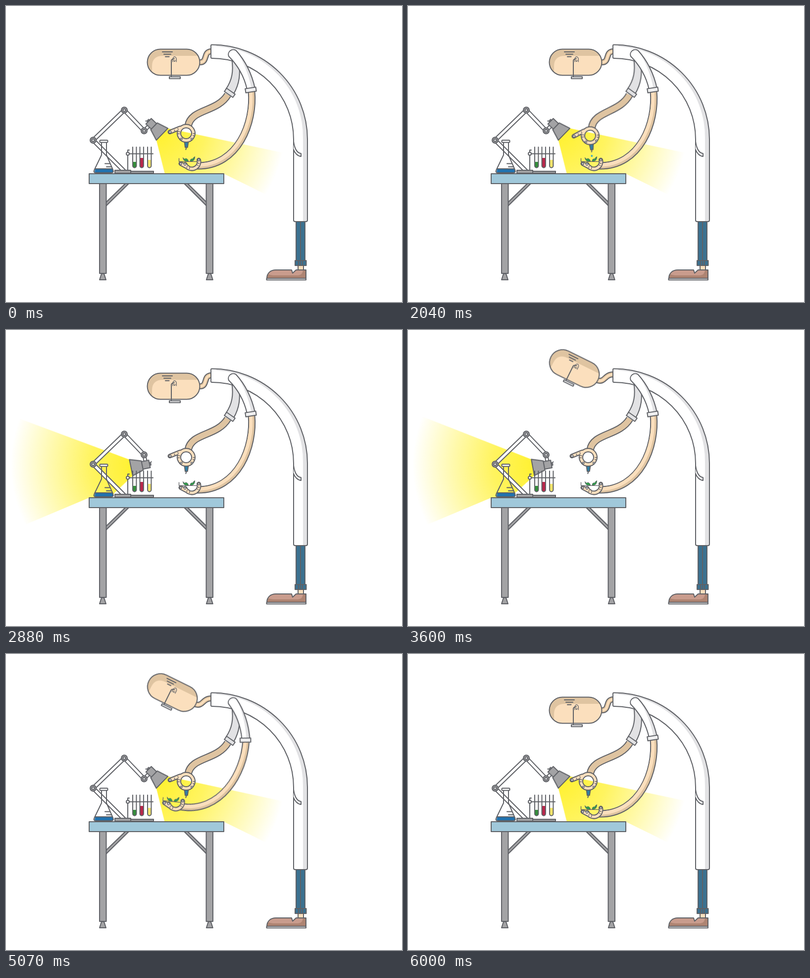
Recreate the animation shown at these times as an HTML page. Size 800 by 600 pixels, loop 6.21 s.

```html
<!DOCTYPE html>
<html lang="en">
<head>
<meta charset="utf-8">
<title>Lab bench</title>
<style>
html, body { margin: 0; width: 100%; height: 100%; overflow: hidden; background: #fff; }
svg { display: block; width: 800px; height: 600px; }
:root { --ink: #5f6166; --skin: #fbdfbd; --tan: #dfc4a1; --steel: #a3a3a5; --cloth: #e2e2e4; }
.o { stroke: var(--ink); stroke-width: 2; stroke-linejoin: round; stroke-linecap: round; }
.l { fill: none; }
.w { fill: #fff; }
.skin { fill: var(--skin); }
.steel { fill: var(--steel); }
.cloth { fill: var(--cloth); }
.blue { fill: #3b7190; }
.leaf { fill: #2fa04b; stroke-width: 1; }
.nail { fill: #fff; stroke-width: 1.5; }
.thin { stroke-width: 1.3; }
/* Stroked tubes: the same path drawn wide in ink, then narrower in colour */
.t { fill: none; stroke-linecap: round; stroke-linejoin: round; }
.butt { stroke-linecap: butt; }
.ink { stroke: var(--ink); }
.fs { stroke: var(--skin); }
.ft { stroke: var(--tan); }
.fw { stroke: #fff; }

.anim, .anim * { animation-duration: 6210ms; animation-iteration-count: infinite; }
.lamp { transform-origin: 279px 253px; animation-name: lamp; }
.head { transform-origin: 414px 91px; animation-name: head; }
.neck { animation-name: neck; }
.arm { transform-origin: 458px 97px; animation-name: arm; }
.fore { transform-origin: 495px 172px; animation-name: fore; }
.cup { transform-origin: 388px 322px; animation-name: cup; }
.back, .reach, .pinch { animation-timing-function: ease-in-out; }
.back { transform-origin: 462px 105px; animation-name: back; }
.reach { transform-origin: 452px 176px; animation-name: reach; }
.pinch { transform-origin: 364px 258px; animation-name: pinch; }
.drop { animation-name: drop; animation-timing-function: linear; }

@keyframes lamp {
  0%, 33.01% { transform: rotate(44deg); animation-timing-function: cubic-bezier(.5,0,.15,1); }
  48.31%, 72.46% { transform: rotate(169.5deg); animation-timing-function: cubic-bezier(.5,0,.3,1); }
  82.13%, 100% { transform: rotate(44deg); }
}
@keyframes head {
  0%, 47.75% { transform: rotate(0deg); animation-timing-function: cubic-bezier(.45,0,.4,1); }
  53.54%, 87.36% { transform: rotate(26.3deg); animation-timing-function: cubic-bezier(.45,0,.4,1); }
  92.75%, 100% { transform: rotate(0deg); }
}
@keyframes neck {
  0%, 47.75% { d: path("M389 114C409 117 397 92 415 92"); animation-timing-function: cubic-bezier(.45,0,.4,1); }
  53.54%, 87.36% { d: path("M382 102C399 107 396 90 415 90"); animation-timing-function: cubic-bezier(.45,0,.4,1); }
  92.75%, 100% { d: path("M389 114C409 117 397 92 415 92"); }
}
@keyframes arm {
  0%, 58.78% { transform: rotate(0deg); animation-timing-function: ease-in-out; }
  70.05%, 74.24% { transform: rotate(18.4deg); animation-timing-function: ease-in-out; }
  88.9% { transform: rotate(-1.6deg); animation-timing-function: ease-in-out; }
  96%, 100% { transform: rotate(0deg); }
}
@keyframes fore {
  0%, 58.78% { transform: rotate(0deg); animation-timing-function: ease-in-out; }
  70.05%, 74.24% { transform: rotate(-2.6deg); animation-timing-function: ease-in-out; }
  88.9% { transform: rotate(4.3deg); animation-timing-function: ease-in-out; }
  96%, 100% { transform: rotate(0deg); }
}
@keyframes cup {
  0%, 58.78% { transform: rotate(0deg); animation-timing-function: ease-in-out; }
  70.05%, 74.24% { transform: rotate(-4deg); animation-timing-function: ease-in-out; }
  88.9% { transform: rotate(-2.7deg); animation-timing-function: ease-in-out; }
  96%, 100% { transform: rotate(0deg); }
}
@keyframes back {
  0%, 13.53%, 27.05%, 40.58%, 100% { transform: rotate(0deg); }
  6.76%, 20.29%, 33.82% { transform: rotate(.8deg); }
}
@keyframes reach {
  0%, 13.53%, 27.05%, 40.58%, 100% { transform: rotate(0deg); }
  6.76%, 20.29%, 33.82% { transform: rotate(-4.3deg); }
}
@keyframes pinch {
  0%, 13.53%, 27.05%, 40.58%, 100% { transform: rotate(0deg); }
  6.76%, 20.29%, 33.82% { transform: rotate(-3deg); }
}
@keyframes drop {
  0%, 5.2%, 7.3%, 18.73%, 20.83%, 32.25%, 34.35%, 100% { opacity: 0; transform: translateY(0); }
  5.3%, 18.83%, 32.35% { opacity: 1; transform: translateY(0); }
  7.25%, 20.78%, 34.3% { opacity: 1; transform: translateY(22px); }
}
</style>
</head>
<body>
<svg viewBox="0 0 800 600" xmlns="http://www.w3.org/2000/svg">
<defs>
  <radialGradient id="glow" gradientUnits="userSpaceOnUse" cx="283.3" cy="232.8" r="269">
    <stop offset=".1" stop-color="#fff133"/>
    <stop offset=".4" stop-color="#fff133" stop-opacity=".78"/>
    <stop offset=".7" stop-color="#fff133" stop-opacity=".4"/>
    <stop offset="1" stop-color="#fff133" stop-opacity="0"/>
  </radialGradient>
  <clipPath id="lit"><path d="M0 0H800V518L440 340H168L0 411Z"/></clipPath>
  <clipPath id="skull"><rect x="285.5" y="87.5" width="106" height="53" rx="26.5"/></clipPath>
  <path id="jib" d="M238 334L176 272L239 211L279 253"/>
  <path id="foreFront" d="M496 173C502 235 470 325 386 324"/>
  <path id="foreBack" d="M448 180C426 216 374 208 368 243"/>
  <path id="ring" d="M364 243.5a14.5 14.5 0 1 1 -.1 0M331 255.5L352 247"/>
  <path id="grip" d="M389.5 312A14.5 14.5 0 0 1 362 321M353 319.5L368 327.500"/>
  <path id="coat" d="M414 80.500Q414 78.500 416 78.500A193 191.500 0 0 1 609 270V434Q609 437 606 437H584Q581 437 581 434V270A165 164 0 0 0 416 106Q414 106 414 104Z"/>
  <path id="sleeve" d="M450 102A9.800 9.800 0 0 1 465 90.500C483 110 497 138 503 167L487 169C482 147 470 122 450 102Z"/>
  <g id="joint"><circle class="o steel" r="6"/><circle class="o w" r="2.600"/></g>
  <path id="tube" class="o l" d="M0 286V324a3.700 3.700 0 0 0 7.400 0V286"/>
</defs>

<g class="anim">
  <!-- light -->
  <g clip-path="url(#lit)">
    <path class="lamp" fill="url(#glow)" d="M283.3 232.800L511.400 90.300A269 269 0 0 1 511.400 375.300Z"/>
  </g>

  <!-- desk lamp -->
  <use href="#jib" class="t ink" stroke-width="9"/>
  <use href="#jib" class="t fw" stroke-width="5"/>
  <g class="lamp">
    <path class="t ink" stroke-width="8" d="M279 253V240"/>
    <path class="t fw" stroke-width="4" d="M279 253V240"/>
    <path class="o l" d="M273 232L267.500 236.500"/>
    <path class="o steel" d="M272 230h-2.500v5h2.500"/>
    <rect class="o steel" x="272" y="225" width="15" height="15.500"/>
    <path class="o steel" d="M310 249.500V216L287 223V242Z"/>
  </g>
  <use href="#joint" x="176" y="272"/>
  <use href="#joint" x="239" y="211"/>
  <use href="#joint" x="279" y="253"/>
  <rect class="o steel" x="220" y="333" width="32" height="6"/>
  <rect class="o steel" x="252" y="335" width="46" height="4"/>

  <!-- flask -->
  <path fill="#2272ae" d="M180 330H215L217 337H179Z"/>
  <path class="o l" d="M193 277V302L178.500 332Q176 338 181 338H213Q218.500 338 216 332L203 302V277M180 330H215M200 319.500H209M203 326H213"/>
  <rect class="o w" x="189.500" y="272" width="16" height="4.500" rx="1.500"/>

  <!-- test tubes -->
  <path class="o l" d="M246 333V292H249M249 299.500H297"/>
  <circle class="o w" cx="246" cy="299.500" r="3"/>
  <path fill="#348f3b" d="M256 316h7.400v8a3.700 3.700 0 0 1-7.400 0z"/>
  <path fill="#b9264a" d="M270.500 308h7.400v16a3.700 3.700 0 0 1-7.400 0z"/>
  <path fill="#f4e56c" d="M286 312h7.400v12a3.700 3.700 0 0 1-7.400 0z"/>
  <use href="#tube" x="256"/>
  <use href="#tube" x="270.500"/>
  <use href="#tube" x="286"/>

  <!-- table -->
  <path class="o steel" d="M241 360H248L202 405.500V398ZM360 360H367L405 397.500V405Z"/>
  <path class="o steel" d="M189 360h13.500v182h-13.500zM404.500 360h13.500v182h-13.500z"/>
  <path class="o steel" d="M193 542.500h5l4 12.500h-13zM408.800 542.500h5l4 12.500h-13z"/>
  <rect class="o" fill="#a0c8da" x="168" y="340" width="272" height="20"/>

  <!-- far arm -->
  <g class="back">
    <g class="reach">
      <use href="#foreBack" class="t ink butt" stroke-width="15.500"/>
      <use href="#foreBack" class="t ft butt" stroke-width="11.500"/>
      <g class="pinch">
        <path class="o" fill="#2f80a6" d="M360.500 275H368.500L366.700 286.500H362Z"/>
        <path class="o l" d="M364.300 287L363.300 291"/>
        <use href="#ring" class="t ink" stroke-width="9"/>
        <use href="#ring" class="t fs" stroke-width="5"/>
        <ellipse class="o nail" cx="331.500" cy="255.500" rx="2.500" ry="1.800" transform="rotate(-22 331.500 255.500)"/>
        <ellipse class="o nail" cx="354" cy="269.500" rx="2" ry="1.600"/>
        <ellipse class="o nail" cx="375.500" cy="269.500" rx="2" ry="1.600"/>
        <path class="o l thin" d="M340 251l1 2.500M347 248l1 2.500M348 254.500l3 .5M347.500 259h3M378 258.500h3M377.500 262.500l3 .8"/>
      </g>
    </g>
    <path class="o cloth" d="M456 106C460 132 457 150 444 169L460 178C472 157 474 138 470 108Z"/>
    <rect class="o cloth" x="441.500" y="172" width="21" height="8" transform="rotate(35 452 176)"/>
  </g>
  <circle class="drop" cx="371.300" cy="298" r="1.900" fill="#35a6c6"/>

  <!-- leg and shoe -->
  <rect class="o skin" x="590" y="524" width="11" height="12"/>
  <path class="o blue" d="M586 434h18v83h-18zM595 434V517"/>
  <path class="o blue" d="M584 516h22.500v10H584zM591 516v10M595 518v8M599 516v10"/>
  <path fill="#c99c8d" d="M527 552C527 541 535 535 545 535H577L579 541.500L586 535H606V552Z"/>
  <path fill="#ae8472" d="M527 552Q527 546 531 544Q534 546 545 546H590Q599 546 600 535H606V552Z"/>
  <path class="o l" d="M527 552C527 541 535 535 545 535H577L579 541.500L586 535H606V552Z"/>
  <rect class="o w" x="526.500" y="552" width="79.500" height="3.300"/>

  <!-- neck and head -->
  <path class="neck t ink butt" stroke-width="12" d="M389 114C409 117 397 92 415 92"/>
  <path class="neck t ft butt" stroke-width="8" d="M389 114C409 117 397 92 415 92"/>
  <path class="neck t fs butt" stroke-width="4" d="M389 114C409 117 397 92 415 92"/>
  <g class="head">
    <g clip-path="url(#skull)">
      <path fill="var(--tan)" d="M285 87H392V141H285Z"/>
      <path class="skin" d="M295 141V122Q295 101 317 101H392V141Z"/>
    </g>
    <rect class="o l" x="285.500" y="87.500" width="106" height="53" rx="26.500"/>
    <path class="o l" d="M316 93H336M319 97.700H333M322 102.700H329.500"/>
    <path class="o skin thin" d="M337 113V107.500a3.600 4.500 0 0 1 7.200 0V113"/>
    <path class="o l thin" d="M339 110.500l1.500 2 1.500-2"/>
    <path class="o l" d="M334 143V111Q334 107.500 340 107"/>
    <rect class="o w" x="330" y="143.500" width="22" height="3.800"/>
  </g>

  <!-- coat -->
  <use href="#coat" class="w"/>
  <path class="cloth" d="M425 79A193 191.500 0 0 1 609 270V436H600V270A184 184 0 0 0 425 82Z"/>
  <use href="#coat" class="o l"/>
  <path class="o w" d="M581 275C583 289 588 298 596 299V305C589 304 583 298 581 291"/>

  <!-- near arm -->
  <g class="arm">
    <g class="fore">
      <use href="#foreFront" class="t ink butt" stroke-width="15"/>
      <use href="#foreFront" class="t ft butt" stroke-width="11"/>
      <use href="#foreFront" class="t fs butt" stroke-width="7" x="-1.800" y="-1.500"/>
      <g class="cup">
        <path class="o leaf" d="M357.500 307.500Q361 312 363 309Q368 310 368.500 315Q358 316 357.500 307.500Z"/>
        <path class="o leaf" d="M381.500 305.500Q378 307 377.500 310Q372 309 372 315Q382 315 381.500 305.500Z"/>
        <path class="o l thin" d="M349.500 309V315.300H391"/>
        <use href="#grip" class="t ink" stroke-width="9"/>
        <use href="#grip" class="t fs" stroke-width="5"/>
        <ellipse class="o nail" cx="353" cy="319.800" rx="2.300" ry="1.800"/>
        <ellipse class="o nail" cx="361.500" cy="320.500" rx="2" ry="2.300"/>
        <ellipse class="o nail" cx="389.500" cy="312" rx="1.700" ry="2.200"/>
        <path class="o l thin" d="M366 325l-1 2.500M371 327.500l-.5 2.500M387.500 318.500l3 .5M386 322l2.500 1.500"/>
      </g>
    </g>
    <use href="#sleeve" class="w"/>
    <path class="cloth" d="M465 90.500C483 110 497 138 503 167L496 168C491 141 480 112 465 90.500Z"/>
    <use href="#sleeve" class="o l"/>
    <rect class="o" fill="#f0f0f1" x="483.700" y="166" width="21.500" height="8.300" transform="rotate(-9 494.500 170)"/>
  </g>
</g>
</svg>
</body>
</html>
```
